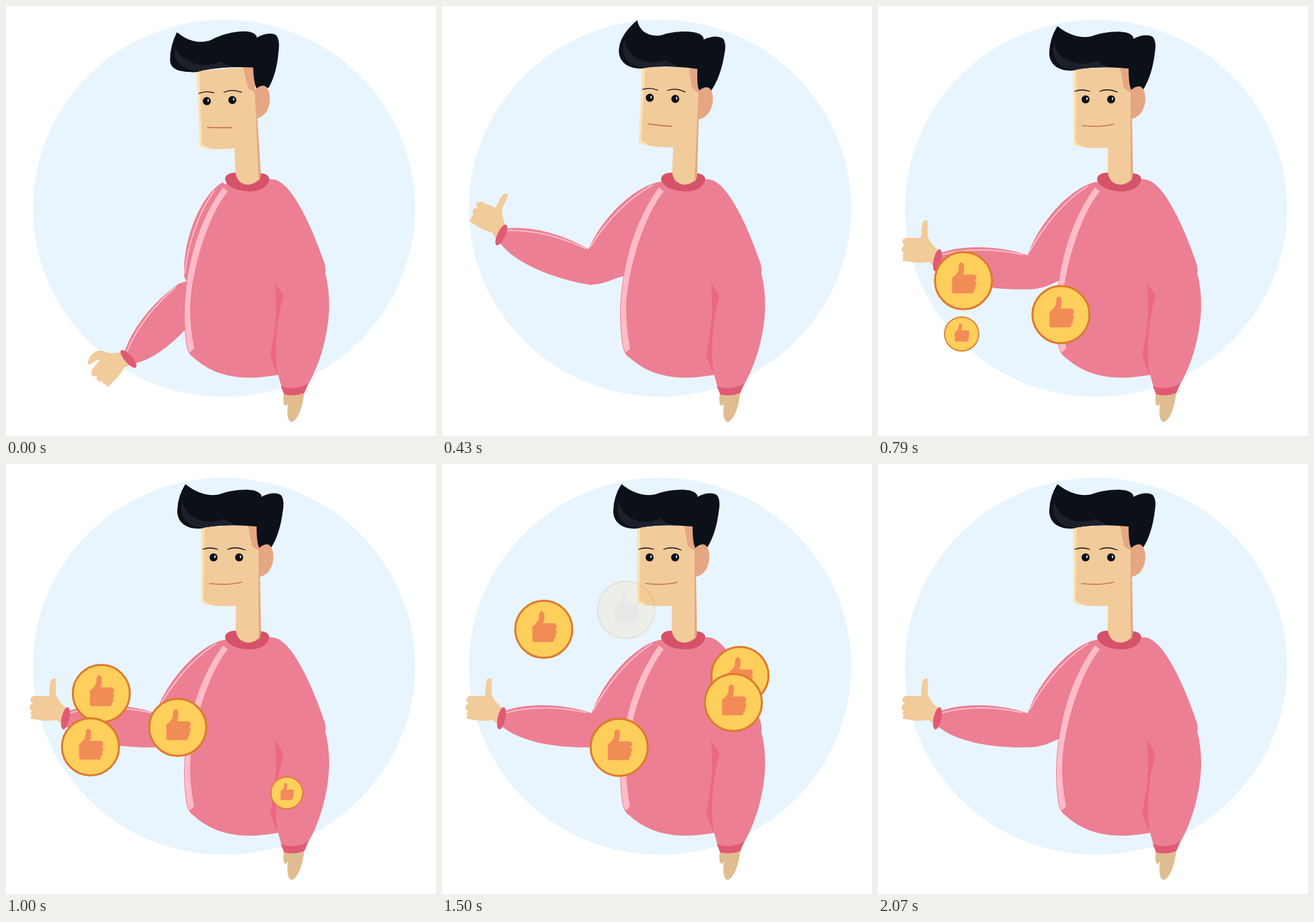
These frames come from a looping animation (640x640 px, 2.78 s). An HTML page:

```html
<!DOCTYPE html>
<html lang="en">
<head>
<meta charset="utf-8">
<title>Thumbs up</title>
<style>
  html, body { margin: 0; width: 100%; height: 100%; overflow: hidden; background: #fff; }
  svg { display: block; width: 100vw; height: 100vh; }
  .skin { fill: #f2cb9b; }
  .shade { fill: #e5a683; }
  .knit { fill: #ec7f93; }
  .cuff { fill: #e05a75; }
  .shine { fill: none; stroke: #ffbcc8; stroke-width: 2; stroke-linecap: round; }
  .brow { fill: none; stroke: #0c1018; stroke-width: 1.3; stroke-linecap: round; }
</style>
</head>
<body>
<svg viewBox="0 0 640 640">
  <defs>
    <g id="coin">
      <circle r="42.5" fill="#ffcf5c" stroke="#dd7a2e" stroke-width="3"/>
      <path fill="#f28c57" d="M-17-4Q-13-7-9-12Q-7-16-7-23Q-6-27-3-27Q1-26 1-21Q1-13-1-9H15Q20-8 19-4Q19-1 17 0Q20 2 19 5Q18 8 17 8Q19 9 17 13Q16 14 15 14Q16 18 13 19H-14Q-17 19-17 16Z"/>
    </g>
  </defs>
  <ellipse cx="324.5" cy="301" rx="284.5" ry="280.5" fill="#e8f5fe"/>

  <g id="upper">
    <path class="knit" d="M328 261C288 267 238 324 223 371L228 421C246 422 258 413 272 408L320 390L340 280Z"/>
    <path class="shine" d="M312 268Q262 300 226 365"/>
    <g id="fore">
      <g id="hand" class="skin">
        <path id="thumb"/>
        <path d="M90 364Q79 354 75 346L64 345H43Q36 346 36 351Q37 355 40 356Q35 358 35 363Q36 367 39 368Q35 371 38 374Q36 377 37 379Q60 384 75 381L85 388Z"/>
      </g>
      <path class="knit" d="M90 369C120 356 175 355 223 371L250 390L236 421C180 425 118 415 90 391Z"/>
      <path class="shine" d="M96 370Q150 356 215 370"/>
      <ellipse class="cuff" cx="88.5" cy="378.5" rx="5.8" ry="16.8" transform="rotate(12 88.5 378.5)"/>
    </g>
  </g>

  <path fill="#dfbd90" d="M414 575C411 589 414 596 417 595Q419 594 420 590C417 609 420 619 426 619C436 615 443 592 444 572Z"/>
  <path class="knit" d="M323 270C290 315 266 380 265 460Q266 505 272 516Q275 521 280 524C310 551 350 559 405 549L411 570Q430 575 448 566C470 530 481 480 481 445Q481 420 475 397Q477 395 474 383C456 330 424 258 396 258L330 261Z"/>
  <path fill="#ed6882" d="M400 410L413 431C404 465 399 500 404 549L393 520C400 485 405 455 400 410Z"/>
  <path class="cuff" d="M409 566L414 578Q428 582 444 576L450 562Q430 573 409 566Z"/>
  <path fill="#ffbcc8" d="M323 270C290 315 267 380 266 460Q267 505 273 516L280 510Q274 480 274 450C276 390 302 310 330 276Z"/>
  <path fill="#d65269" d="M326 258Q327 248 342 248L380 249Q392 250 392 259Q386 276 362 276Q330 274 326 258Z"/>

  <g id="head">
    <path class="skin" d="M291 94V206Q305 213 342 211V247Q344 265 361 266Q378 264 379 250L377 120V90Z"/>
    <path fill="#fbe3b4" d="M290 94H295L294 203L306 210Q298 210 291 206Z"/>
    <path class="shade" d="M360 90H376V129L366 122ZM376 125V262Q379.5 257 379.5 250L378 165V125Z"/>
    <g id="top">
      <path id="hair" fill="#0c1018"/>
      <path id="gloss" fill="#1d202b"/>
    </g>
    <path class="shade" d="M376 126Q384 118 391 120Q398 124 398 140Q396 163 378 168Z"/>
    <path class="brow" d="M293 127Q303 123 315 127M330 127Q342 122 356 128"/>
    <g id="eyes">
      <g fill="#0c1018"><circle cx="309" cy="139" r="6"/><circle cx="347" cy="139" r="6"/></g>
      <g fill="#fff"><ellipse cx="311" cy="138" rx="1" ry="2"/><ellipse cx="349" cy="138" rx="1" ry="2"/></g>
    </g>
    <path id="mouth" fill="none" stroke="#c9775b" stroke-width="1.7" stroke-linecap="round"/>
  </g>
  <g id="coins"></g>
</svg>
<script>
const LOOP = 2780, LAST = 29;
const $ = id => document.getElementById(id);
const set = (id, attr, value) => $(id).setAttribute(attr, value);
const turn = (id, angle, x, y) => set(id, 'transform', `rotate(${angle} ${x} ${y})`);
const clamp = (v, a = 0, b = 1) => Math.min(b, Math.max(a, v));
const mix = (a, b, u) => a + (b - a) * u;
const ease = (n, from, to) => {
  const u = clamp((n - from) / (to - from));
  return u * u * (3 - 2 * u);
};

// Swing: -1 lowered, 0 settled, peak when overshooting.
const swing = (n, top, end, peak) =>
  n < top ? mix(-1, peak, ease(n, 0, top)) : peak * (1 - ease(n, top, end));
const pose = (p, low, high) => p < 0 ? -p * low : p * high;

// Horizontal drift of a rising coin, by column.
const side = (mid, amp) => y => mid - amp * Math.cos(Math.PI * clamp((445 - y) / 175));
const centre = y => {
  const u = (495 - y) / 170;
  return 260.5 + 15 * Math.cos(Math.PI * (u + 0.35 * Math.max(0, u - 1)));
};
const left = side(138, 13.5), right = side(433, 15);
const coins = [
  [13, 489.5, left], [13.6, 532, centre], [18.9, 489.5, left],
  [24, 489.5, right], [27, 489.5, right], [28.8, 532, centre]
].map(([birth, y0, drift]) => {
  const el = document.createElementNS('http://www.w3.org/2000/svg', 'use');
  el.setAttribute('href', '#coin');
  $('coins').append(el);
  return { el, birth, y0, drift };
});

// Radius pops past full size, then settles.
const pop = [0, 24.5, 42, 49, 49, 46, 44];
function radius(age) {
  const a = clamp(age + 1, 0, pop.length - 1), i = Math.floor(a);
  return mix(pop[i], pop[Math.min(i + 1, pop.length - 1)], a - i);
}

function drawArm(p) {
  const u = pose(p, -21.8, 3.7), f = pose(p, -53, 13), h = pose(p, -53, 24);
  turn('upper', u, 329, 277);
  turn('fore', f - u, 228, 394);
  turn('hand', h - f, 88, 378);
  // The thumb unfolds from bent to upright.
  const at = (x0, y0, x1, y1) => {
    const up = 1 + Math.min(p, 0);
    return `${mix(x0, x1, up)} ${mix(y0, y1, up)}`;
  };
  set('thumb', 'd', `M64 348L${at(59, 342, 65, 331)}Q${at(50, 338, 66, 319)} ${at(46, 337, 71, 319)}
    L${at(48, 333, 74, 320)}Q${at(65, 327, 74, 332)} ${at(74, 338, 74, 344)}Q77 350 82 356Z`);
}

function drawHead(p, smile) {
  const m = Math.min(p, 0), x = 267 + 9 * p + 4 * p * p, y = 30 - 5.5 * p;
  turn('head', 2.5 * p, 361, 257);
  set('top', 'transform', `translate(${-2 * m} ${m})`);
  set('hair', 'd', `M${x} ${y}C${285 + 7 * m} ${44 - 6 * m} ${303 + 7 * m} ${49 - 6 * m} ${318 + 5 * m} ${45 - 4 * m}
    C334 38 372 34 379 45Q381 47 380 49Q398 40 409 46Q415 53 412 70Q408 103 395 124L377 125Q373 118 373 93
    Q330 89 298 94Q290 97 283 96C266 95 ${254 + 5 * m} ${85 - 7 * m} ${255 + 5 * m} ${68 - 8 * m}
    Q${256 + 5 * m} ${47 - 8 * m} ${x} ${y}Z`);
  set('gloss', 'd', `M${262 + 4 * m} ${54 - 6 * m}C267 74 282 86 305 86Q320 85 324 81Q333 87 343 91
    Q315 91 292 95C268 93 ${257 + 4 * m} 78 ${262 + 4 * m} ${54 - 6 * m}Z`);
  set('eyes', 'transform', `translate(${-5 * (1 - smile)})`);
  set('mouth', 'd', `M303.5 178Q${mix(321, 330, smile)} ${mix(179.5, 181, smile)} ${mix(339, 350.5, smile)} ${mix(180, 176, smile)}`);
}

function drawCoins(n, done) {
  for (const { el, birth, y0, drift } of coins) {
    const age = n - birth, y = y0 - 13.45 * age;
    const shown = !done && age > -1 && y > 213;
    el.setAttribute('opacity', shown ? clamp((y - 213) / 33) : 0);
    el.setAttribute('transform', `translate(${drift(y)} ${y}) scale(${radius(age) / 44})`);
  }
}

function frame(now) {
  const t = now % LOOP;
  // Motion runs at 25 steps a second, shown 14 times a second.
  const k = Math.min(LAST, Math.floor((Math.floor(t / 10) * 10 + 5) * 0.014));
  const n = Math.max(0, Math.ceil(k * 25 / 14 - 1e-9) - 1);
  drawArm(swing(n, 10, 14, 1));
  drawHead(swing(n, 8, 16, 1.2), ease(n, 10, 16));
  drawCoins(n, k === LAST);
}

const start = performance.now();
function tick() {
  frame(performance.now() - start);
  requestAnimationFrame(tick);
}
tick();
</script>
</body>
</html>
```
